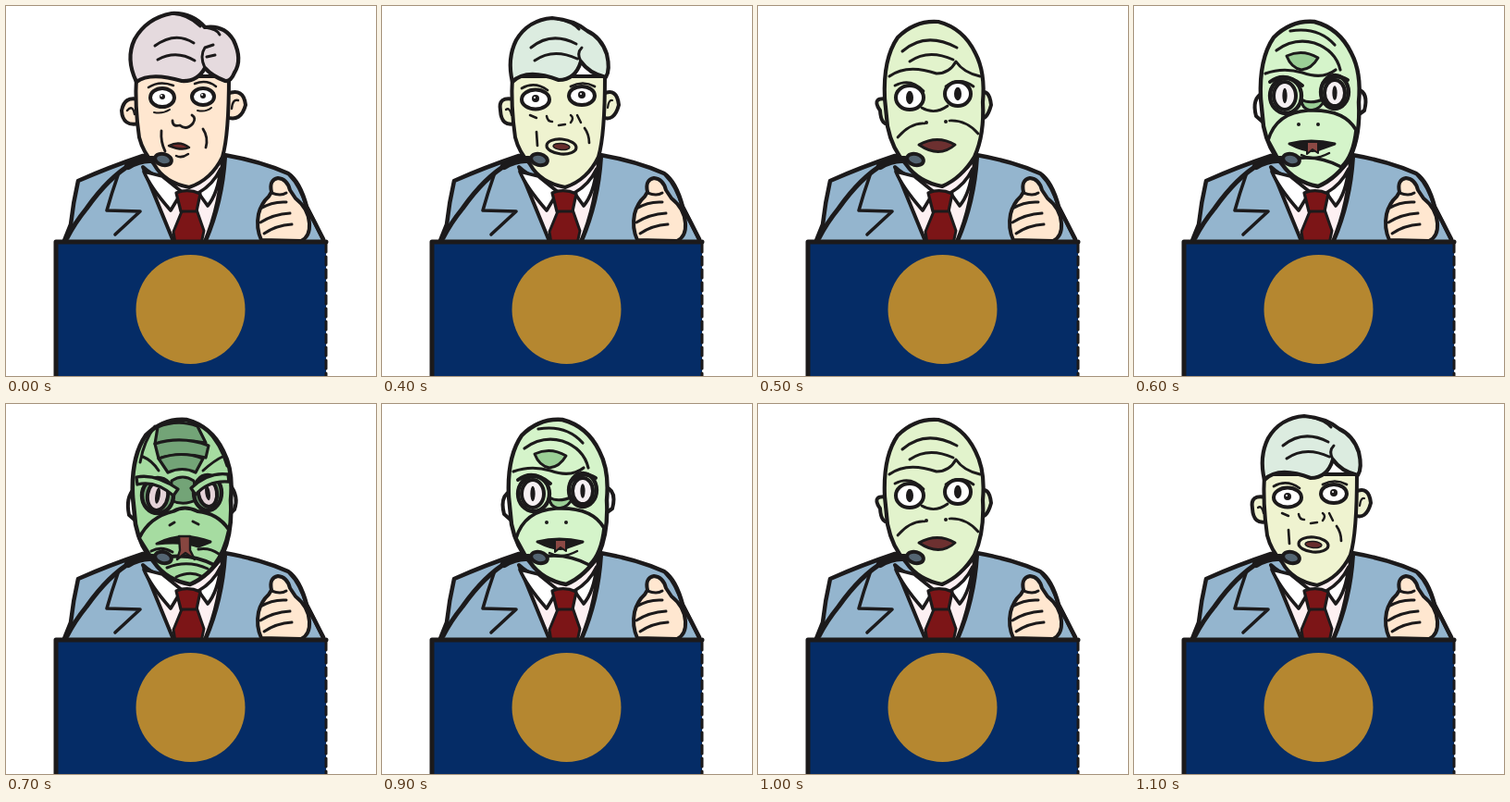
Animation, 400 px wide and 400 px high, one loop 1200 ms. Source, as an HTML page:

```html
<!DOCTYPE html>
<html lang="en">
<head>
<meta charset="utf-8">
<title>Speech at the podium</title>
<style>
html, body { margin: 0; width: 100%; height: 100%; overflow: hidden; background: #fff; }
svg { display: block; width: 100vw; height: 100vh; }
</style>
</head>
<body>
<svg viewBox="0 0 400 400" fill="none" stroke="#1c1a1b" stroke-width="3.6" stroke-linecap="round" stroke-linejoin="round">
  <g id="body"></g>
  <g id="heads"></g>
  <g id="front"></g>
</svg>
<script>
const INK = '#1c1a1b', SUIT = '#94b5ce', SHIRT = '#fdf0f2', SKIN = '#ffe7d0';
const NAVY = '#052c66', GOLD = '#b58730', TIE = '#7c1517';

const path = (d, fill = 'none', w = 3.6) => `<path d="${d}" fill="${fill}" stroke-width="${w}"/>`;
const line = (d, w = 3) => path(d, 'none', w);
const oval = (x, y, rx, ry, fill, w = 3.6, turn = 0) =>
  `<ellipse cx="${x}" cy="${y}" rx="${rx}" ry="${ry}" fill="${fill}" stroke-width="${w}" transform="rotate(${turn} ${x} ${y})"/>`;
const dot = (x, y, r = 1.6) => oval(x, y, r, r, INK, 0);
const eye = (x, y, rx, ry, pupil) => oval(x, y, rx, ry, '#fff', 4) + oval(x, y - 1, pupil, pupil, INK, 0) + oval(x - 1, y - 2, 1, 1, '#fff', 0);
const slitEye = (x, y, rx, ry, turn, fill, slit) =>
  oval(x, y, rx, ry, fill, 4, turn) + oval(x, y, slit, ry * .55, INK, 0, turn);

function body() {
  return path('M62 256L70 236C72 218 75 202 78 189Q112 174 148 162L236 161Q276 168 305 181Q318 190 325 217L343 252V257Z', SUIT, 4.5)
    + path('M148 174Q165 190 190 190Q220 188 234 164Q233 212 214 257H182Z', SHIRT, 4)
    + path('M149 179Q156 196 178 221L190 201L169 184Z', '#fff', 3.6)
    + path('M208 202L218 216Q229 203 232 176Q224 193 208 202Z', '#fff', 3.6)
    + path('M190 222L181 244L183 257H211L214 243L206 220Z', TIE, 3)
    + path('M184 202Q197 197 210 203L206 222H189Z', TIE, 3.2)
    + line('M121 183Q114 203 109 221L145 222L118 247', 3.6)
    + line('M237 164Q234 212 216 254', 4)
    + path('M284 206Q276 213 273 225Q270 240 276 253L319 254Q329 249 328 235Q327 219 313 208L307 199Q304 187 294 186Q284 188 287 201Z', SKIN, 4)
    + line('M287 202Q297 206 303 202M275 219Q288 211 303 212M275 234Q289 225 307 224M279 246Q292 237 309 236')
    + line('M307 183Q318 194 325 217Q334 234 343 253', 4);
}

const manFace = 'M141 76Q139 108 144 142Q148 158 160 171Q171 191 198 196Q222 188 234 163Q241 140 241 76Z';
const ears = (fill, s) => path(`M143 101Q${128 - s} 97 ${125 + s} 113Q${126 + s} 131 144 127`, fill, 4)
  + path(`M239 95Q${257 - s} 88 ${259 - s} 107Q${254 - s} 126 238 120`, fill, 4);

function man() {
  const hair = '#e5dade';
  return ears(SKIN, 0) + line('M131 113Q137 106 139 117M251 102Q245 100 244 111', 2.4)
    + path(manFace, SKIN, 4)
    + path('M141 82Q129 57 139 36Q152 13 179 8Q201 7 215 23Q236 20 246 37Q256 58 247 72Q243 82 237 81Q223 76 215 67Q207 82 190 81Q156 71 141 82Z', hair, 4.2)
    + line('M161 43Q183 27 203 40M164 58Q184 47 204 59M179 8Q197 9 210 22M215 23Q229 25 231 31M215 67Q209 54 215 45L224 42M217 55L226 53', 3)
    + eye(169, 99, 13, 10, 3) + eye(213, 98, 12, 9, 3)
    + line('M154 88Q166 80 181 86M204 84Q217 79 227 87', 2.5)
    + line('M160 115Q169 117 177 112M207 113Q216 115 222 110', 2)
    + line('M180 124Q180 131 188 129Q195 135 202 127Q206 121 201 118', 2.8)
    + line('M168 135Q167 147 172 157M213 133Q219 142 216 153', 2.8)
    + path('M176 151Q188 145 198 153Q190 157 176 151Z', '#722c2b', 2.5) + line('M184 162Q190 165 197 160', 2.5);
}

function paleMan() {
  const skin = '#eff3d0';
  return ears(skin, 3) + line('M134 112Q138 109 140 118M249 102Q245 101 244 110', 2.2)
    + path(manFace, skin, 4)
    + path('M141 82Q135 57 145 37Q158 15 184 13Q208 15 222 27Q237 34 243 52Q247 69 242 77Q224 73 215 60Q209 80 191 80Q156 67 141 82Z', '#dcece0', 4.2)
    + line('M161 45Q183 27 210 41M165 59Q185 45 211 57M190 14Q206 17 213 25M215 60Q210 51 216 45', 3)
    + eye(166, 101, 15, 10.5, 4) + eye(216, 97, 14, 10, 4)
    + line('M151 89Q165 81 179 91M204 87Q217 80 230 87', 2.7)
    + line('M160 118L167 121M211 118L215 126M178 119Q179 125 184 125M204 118Q208 121 204 126M191 129L198 128', 2.5)
    + line('M167 136L168 151M219 132Q224 139 224 148', 2.7)
    + oval(194, 152, 16, 8, skin, 3.2, 5) + oval(194, 152, 9, 3.5, '#682d2c', 1.5, 5);
}

const reptileHead = 'M137 100Q135 57 151 34Q170 15 195 17Q222 24 235 51Q246 72 243 104Q245 139 234 163Q220 186 199 195Q173 190 160 171Q145 155 140 130Z';

function changing() {
  const skin = '#e2f3cc';
  return ears(skin, 7) + path(reptileHead, skin, 4.2)
    + line('M142 76Q161 62 193 73Q207 73 214 60Q222 72 240 76', 3)
    + line('M156 49Q181 27 215 45M164 60Q184 46 211 58', 3)
    + slitEye(164, 99, 15, 13, 0, '#fff', 4) + slitEye(216, 95, 14, 13, 0, '#fff', 4)
    + line('M148 86Q165 77 179 92M203 87Q218 76 233 87M177 110Q191 118 205 108', 2.8)
    + dot(182, 126, 2) + dot(203, 125, 2)
    + line('M151 142Q165 126 180 127M207 124Q225 123 238 138', 2.7)
    + path('M174 150Q194 139 213 150Q196 165 174 150Z', '#6d3030', 3);
}

function paleReptile() {
  const skin = '#d5f4ca', dark = '#9bcf96';
  return line('M139 94Q127 100 132 119L141 127M242 90Q254 94 249 113L242 118', 4)
    + path(reptileHead, skin, 4.4)
    + path('M165 54Q182 46 199 56Q192 68 181 69Q170 67 165 54Z', dark, 3)
    + line('M142 73Q161 66 182 72Q204 80 218 69M154 48Q173 34 195 40Q218 48 223 69M169 27Q199 22 217 42', 3.2)
    + path('M181 101Q190 107 207 100Q202 112 191 113Q181 111 181 101Z', dark, 3)
    + path('M145 145Q154 115 188 113Q227 111 240 134Q237 162 224 174Q192 157 158 169Z', skin, 3.6)
    + oval(164, 97, 17, 19, skin, 4.3) + oval(217, 93, 15, 18, skin, 4.3)
    + slitEye(163, 97, 12, 15, 0, '#f6f0f3', 2.6) + slitEye(217, 94, 11, 14, 0, '#f6f0f3', 2.6)
    + line('M147 82Q163 70 182 86M204 84Q216 71 231 80', 4)
    + dot(178, 128, 2) + dot(199, 128, 2)
    + path('M168 149Q191 143 217 149L203 154Q192 161 168 149Z', INK, 3)
    + path('M187 147H199V159L193 155L187 160Z', '#8c4944', 2)
    + line('M181 161Q194 168 211 159', 2.5);
}

function reptile() {
  const skin = '#a6dca1', dark = '#73a477', eyeFill = '#e4d3d8';
  return line('M139 91Q129 101 133 120L141 127M242 87Q252 100 247 114L242 119', 4)
    + path(reptileHead, skin, 4.6)
    + path('M164 25Q186 16 207 24L216 42Q190 37 161 43Z', dark, 3.2)
    + path('M161 43Q190 34 219 45L216 58Q190 51 165 59Z', dark, 3.2)
    + path('M165 59Q190 50 213 59L205 74Q191 67 175 74Z', dark, 3.2)
    + line('M161 24Q149 40 145 63M216 27Q232 43 239 67M148 57Q158 61 165 72M236 56Q225 61 213 72', 3)
    + path('M179 83Q191 75 203 83L207 103Q192 111 178 104Z', dark, 3)
    + path('M144 145Q155 122 181 116Q193 109 207 116Q229 118 241 136Q236 160 225 174Q194 158 159 169Z', skin, 3.8)
    + oval(164, 99, 17, 19, dark, 4.4) + oval(218, 96, 15, 19, dark, 4.4)
    + slitEye(164, 99, 11, 16, 9, eyeFill, 2.7) + slitEye(218, 96, 10, 15, -9, eyeFill, 2.7)
    + path('M141 79Q162 75 186 92L181 99Q161 82 142 87Z', skin, 3.3)
    + path('M240 76Q219 73 200 91L205 98Q219 82 241 84Z', skin, 3.3)
    + line('M182 128L177 131M202 127L208 130', 3)
    + path('M163 151Q190 137 221 149L208 154Q191 148 163 151Z', INK, 3)
    + path('M187 143H199V158L204 168L194 161L185 168L188 158Z', '#874640', 2.4)
    + line('M157 159Q168 153 180 160M208 157Q220 155 230 162M174 177Q196 168 218 178M184 187Q199 180 211 186', 3);
}

function front() {
  const mic = line('M66 251Q74 235 87 219Q111 185 137 170Q149 164 162 165', 5)
    + line('M132 173Q145 165 158 166', 8) + oval(170, 166, 9, 6, '#546572', 4, 14);
  const stand = `<rect x="54" y="255" width="292" height="150" fill="${NAVY}" stroke="none"/>`
    + line('M54 400V255H346', 5)
    + `<path d="M346 257V400" stroke-width="3" stroke-dasharray="9 5"/>`;
  return mic + stand + `<circle cx="199.5" cy="328" r="59" fill="${GOLD}" stroke="none"/>`;
}

const byId = id => document.getElementById(id);
byId('body').innerHTML = body();
byId('front').innerHTML = front();
const stages = [man, paleMan, changing, paleReptile, reptile];
byId('heads').innerHTML = stages.map(draw => `<g>${draw()}</g>`).join('');
const heads = [...byId('heads').children];

// One stage per 100 ms, up from the man to the reptile and back.
function stageAt(ms) {
  const step = Math.floor(ms / 100);
  const up = Math.max(0, step - 3);
  return Math.min(up, 4, 12 - step);
}

function update(ms) {
  const stage = stageAt(ms % 1200);
  heads.forEach((head, i) => head.style.display = i === stage ? '' : 'none');
}

let start;
function tick(now) {
  start ??= now;
  update(now - start);
  requestAnimationFrame(tick);
}
update(0);
requestAnimationFrame(tick);
</script>
</body>
</html>
```
